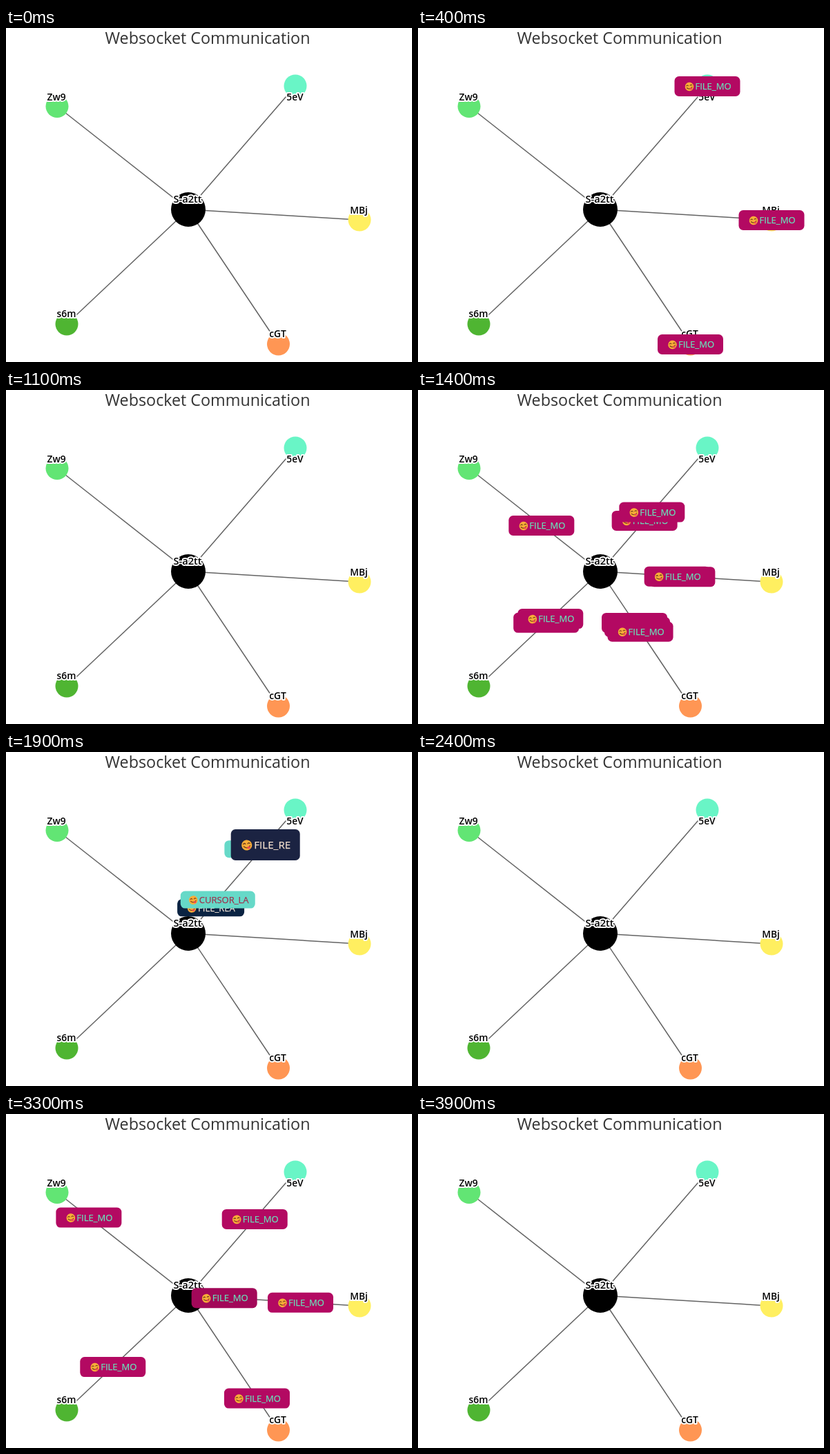
Recreate the animation shown at these times as an HTML page. Size 588 px wide and 484 px high, loop 4000 ms.

```html
<!DOCTYPE html>
<html lang="en">
<head>
<meta charset="utf-8">
<title>Websocket Communication</title>
<style>
  html, body { margin: 0; width: 100%; height: 100%; overflow: hidden; background: #fff; }
  svg { display: block; width: 588px; height: 484px; font-family: "Open Sans", "Noto Sans", sans-serif; }
  .title { font-size: 23.3px; fill: #333; text-anchor: middle; }
  .label { font-size: 13.8px; font-weight: 600; fill: #000; stroke: #fff; stroke-width: 4px;
           stroke-linejoin: round; paint-order: stroke; text-anchor: middle; }
  .edge { stroke: #636363; stroke-width: 1.5; }
  .pill text { stroke-width: 0.25px; }
</style>
</head>
<body>
<svg id="stage" viewBox="0 0 588 484">
  <text class="title" x="292" y="23.3">Websocket Communication</text>
</svg>
<script>
const LOOP = 4000, STEP = 100;
const TRAVEL = 290, LINGER = 38;
const stage = document.getElementById('stage');

function add(parent, tag, attrs, text) {
  const el = document.createElementNS('http://www.w3.org/2000/svg', tag);
  for (const key in attrs) el.setAttribute(key, attrs[key]);
  if (text) el.textContent = text;
  parent.appendChild(el);
  return el;
}

const hub = { x: 264, y: 263, r: 25, color: '#000', name: 'S-a2tt', lx: 263, ly: 253, size: 14.6 };
const nodes = {
  zw: { x: 74, y: 113.5, color: '#62e574', name: 'Zw9', lx: 73, ly: 104.5 },
  ev: { x: 419, y: 84, color: '#69f5c6', name: '5eV', lx: 418.5, ly: 104.5 },
  mb: { x: 512, y: 278, color: '#ffef60', name: 'MBj', lx: 511, ly: 268.7 },
  cg: { x: 394.5, y: 458, color: '#ff9654', name: 'cGT', lx: 393.5, ly: 448.3 },
  sm: { x: 88, y: 429, color: '#4fb532', name: 's6m', lx: 87.5, ly: 419 }
};

const kinds = {
  move:   { text: 'FILE_MO',   w: 95,  h: 29, bg: '#b30962', fg: '#6ae0ba', size: 13, tx: -17.5, ex: -26, r: 6.3 },
  cursor: { text: 'CURSOR_LA', w: 108, h: 25, bg: '#66d9c8', fg: '#9c3650', size: 13, tx: -27, ex: -35.5, r: 6.3 },
  read:   { text: 'FILE_REA',  w: 97,  h: 25, bg: '#0a2342', fg: '#f3e3d6', size: 13, tx: -18.5, ex: -27.5, r: 6.3 },
  reply:  { text: 'FILE_RE',   w: 100, h: 45, bg: '#1b2342', fg: '#efdccb', size: 15.2, tx: -16.5, ex: -27, r: 7.6 }
};

// kind, node, start time, heading to the hub; later entries lie on top
const messages = [
  ['move', 'zw', 65], ['move', 'ev', 75], ['move', 'mb', 85], ['move', 'cg', 82], ['move', 'sm', 70],

  ['cursor', 'ev', 619, true], ['cursor', 'ev', 639],
  ['move', 'ev', 620], ['move', 'ev', 680], ['reply', 'ev', 651],
  ['move', 'zw', 680], ['move', 'mb', 670], ['move', 'cg', 671], ['move', 'sm', 671],

  ['move', 'zw', 1270], ['move', 'ev', 1280], ['move', 'ev', 1260],
  ['move', 'mb', 1261], ['move', 'mb', 1270],
  ['move', 'cg', 1290], ['move', 'cg', 1281], ['move', 'cg', 1271],
  ['move', 'sm', 1271], ['move', 'sm', 1281],

  ['cursor', 'ev', 1701], ['reply', 'ev', 1691],
  ['read', 'ev', 1671, true], ['cursor', 'ev', 1690, true],

  ['move', 'zw', 1960], ['move', 'ev', 1970], ['move', 'mb', 1955], ['move', 'cg', 1985], ['move', 'sm', 1980],

  ['cursor', 'ev', 2471, true], ['read', 'ev', 2441, true],
  ['cursor', 'ev', 2549], ['reply', 'ev', 2560],
  ['move', 'zw', 2550], ['move', 'ev', 2490], ['move', 'mb', 2550], ['move', 'cg', 2550], ['move', 'sm', 2531],

  ['move', 'zw', 3080], ['move', 'ev', 3120], ['move', 'mb', 3110], ['move', 'mb', 3239],
  ['move', 'cg', 3079], ['move', 'sm', 3120]
];

function drawFace(parent, x, r) {
  const face = add(parent, 'g', { transform: `translate(${x} 0.5) scale(${r / 6.3}) rotate(-8)` });
  add(face, 'circle', { r: 6.3, fill: '#f9ad38' });
  add(face, 'path', { d: 'M-4 -1.6q1.3 -1.7 2.6 0M1.4 -1.6q1.3 -1.7 2.6 0M-3.8 1.2q3.8 4 7.6 0',
    fill: 'none', stroke: '#69391c', 'stroke-width': 1.1, 'stroke-linecap': 'round' });
  add(face, 'ellipse', { cx: 2, cy: 3.2, rx: 1.9, ry: 1.5, fill: '#ee4b50' });
}

function drawNode(n) {
  add(stage, 'circle', { cx: n.x, cy: n.y, r: n.r || 16.5, fill: n.color });
  const label = add(stage, 'text', { class: 'label', x: n.lx, y: n.ly }, n.name);
  if (n.size) label.style.fontSize = n.size + 'px';
}

function makePill([kind, to, start, inbound]) {
  const k = kinds[kind];
  const g = add(stage, 'g', { class: 'pill', display: 'none' });
  const frame = { x: -k.w / 2, y: -k.h / 2, width: k.w, height: k.h, rx: 6.5 };
  const box = add(g, 'rect', { ...frame, fill: k.bg });
  const shade = add(g, 'rect', { ...frame, fill: '#000' });
  drawFace(g, k.ex, k.r);
  add(g, 'text', { x: k.tx, y: k.size * 0.36, 'font-size': k.size, fill: k.fg, stroke: k.fg }, k.text);
  return { g, box, shade, kind, node: nodes[to], start, inbound };
}

const all = Object.values(nodes);
for (const n of all) add(stage, 'line', { class: 'edge', x1: hub.x, y1: hub.y, x2: n.x, y2: n.y });
[...all, hub].forEach(drawNode);
const pills = messages.map(makePill);

function placePill(p, time) {
  const age = time - p.start;
  const on = age >= 0 && age <= TRAVEL + LINGER;
  p.g.setAttribute('display', on ? 'inline' : 'none');
  if (!on) return;
  const done = Math.min(1, age / TRAVEL);
  const u = p.inbound ? 1 - done : done;
  const x = hub.x + (p.node.x - hub.x) * u;
  const y = hub.y + (p.node.y - hub.y) * u + 0.5;
  p.g.setAttribute('transform', `translate(${x.toFixed(2)} ${y.toFixed(2)})`);
  // fresh messages leave the hub slightly darkened
  p.shade.setAttribute('opacity', Math.max(0, 0.22 - done * 0.6));
  if (p.kind === 'reply') {
    const h = Math.max(25, Math.min(45, 38 + 110 * (u - 0.484)));
    for (const r of [p.box, p.shade]) {
      r.setAttribute('y', -h / 2);
      r.setAttribute('height', h);
    }
  }
}

function render(ms) {
  const time = Math.floor((ms % LOOP) / STEP) * STEP;
  for (const p of pills) placePill(p, time);
}

const begin = performance.now();
function tick() {
  render(performance.now() - begin);
  requestAnimationFrame(tick);
}
tick();
</script>
</body>
</html>
```
